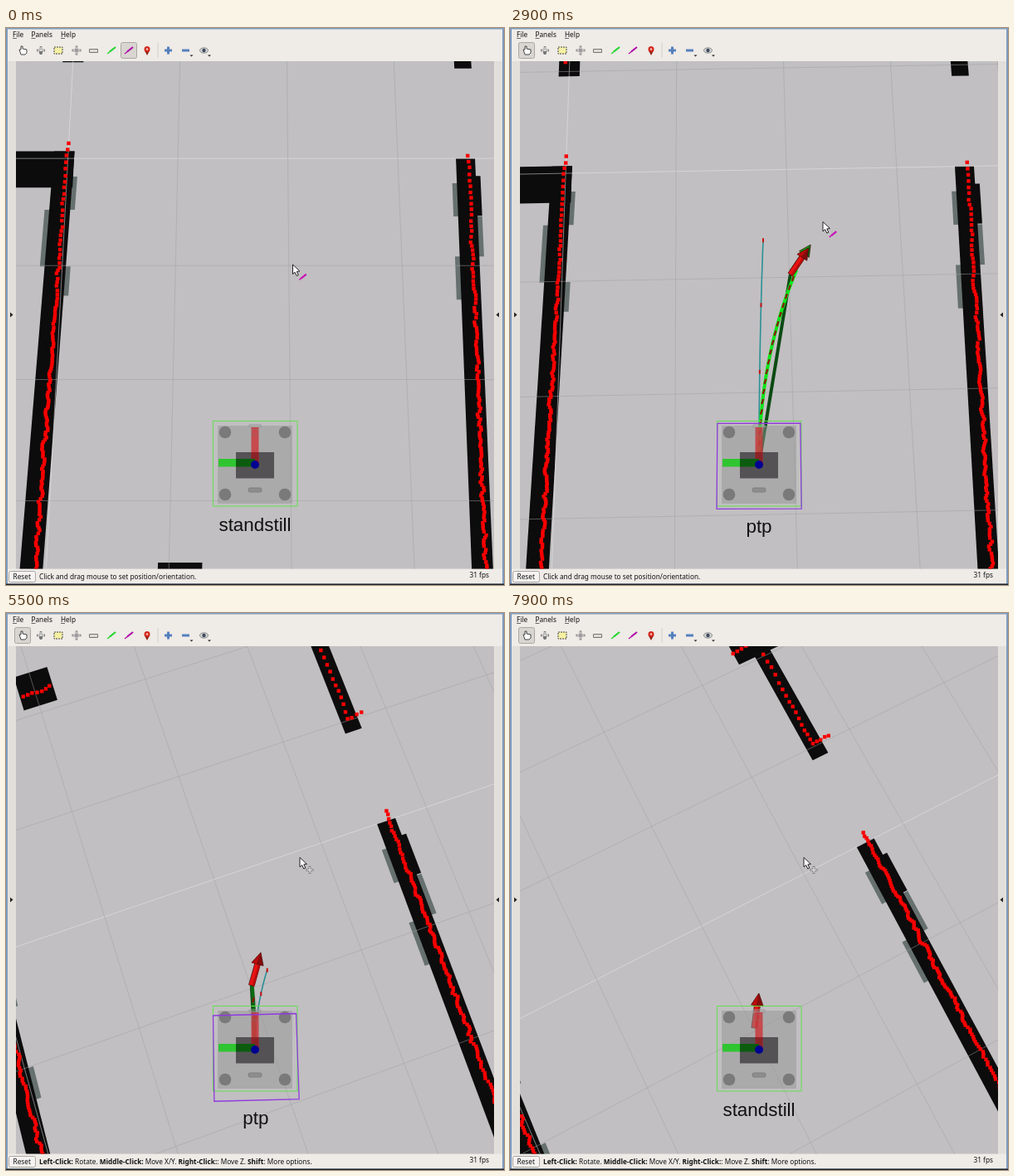
Recreate the animation shown at these times as an HTML page with a canvas. Size 600 by 671 pixels, loop 8000 ms.

```html
<!DOCTYPE html>
<html lang="en">
<head>
<meta charset="utf-8">
<title>Robot navigation view</title>
<style>
html, body { margin: 0; height: 100%; overflow: hidden; background: #efebe7; }
canvas { display: block; }
</style>
</head>
<body>
<canvas id="view" width="600" height="671"></canvas>
<script>
const ctx = document.getElementById('view').getContext('2d');
const LOOP = 8000, STEP = 100, START = 2300, STOP = 7200, RELEASE = 1500, HOVER = 4700;
const UI = '8.25px "Noto Sans", "Open Sans", sans-serif';

// Distance driven over time; heading and sideways drift follow from it
const DRIVE = [[START, 0], [2900, 15.9], [4000, 74.2], [5500, 175.9], [6300, 210.6], [STOP, 224.2]];
const GOAL = { x: 44.3, y: 249.5, dx: 0.573, dy: 0.819 };

// Long side walls: centre x = x + lean * y; patches alternate between the sides
const SIDES = [
  { x: -259.6, lean: 0.0235, half: 13.5, top: 400, seen: 418, side: 1, patches: [365, 320, 245, 207] },
  { x: 268.8, lean: 0.0175, half: 12.5, top: 390, seen: 403, side: -1, patches: [356, 311, 258, 202] }
];
// Other obstacles: x, y, width, height
const CORNER = [-420, 350, 183, 50], KERB = [-114, -200, 52, 88];
const UPPER = [[268, 518, 23, 170], [244, 682, 66, 68], [-259, 527, 28, 230], [-122, 688, 46, 50]];

const mix = (a, b, u) => a + (b - a) * u;
const clamp = u => Math.max(0, Math.min(1, u));
const noise = (a, b) => { const v = Math.sin(a * 127.1 + b * 311.7) * 43758.5; return v - Math.floor(v); };
const centre = (w, y) => w.x + w.lean * y;

function speed(i) {
  if (i === 0 || i === DRIVE.length - 1) return 0;
  return (DRIVE[i + 1][1] - DRIVE[i - 1][1]) / (DRIVE[i + 1][0] - DRIVE[i - 1][0]);
}

function driven(t) {
  let i = 0;
  while (i < DRIVE.length - 2 && t > DRIVE[i + 1][0]) i++;
  const [t0, a] = DRIVE[i], [t1, b] = DRIVE[i + 1], d = t1 - t0, u = clamp((t - t0) / d);
  return mix(a, b, u * u * (3 - 2 * u)) + d * u * (1 - u) * (speed(i) * (1 - u) - speed(i + 1) * u);
}

function poseAt(t) {
  const y = driven(t), r = y * (0.063 + 0.000262 * y) * Math.PI / 180;
  return { x: 0.00075 * y * y, y, c: Math.cos(r), s: Math.sin(r) };
}

let pose;
function local(x, y) {
  const dx = x - pose.x, dy = y - pose.y;
  return [pose.c * dx - pose.s * dy, pose.s * dx + pose.c * dy];
}
function project([x, y]) {
  const k = 1 + 2.23e-4 * y;
  return [300 + x / k, 526 - 1.028 * y / k];
}
const at = (x, y) => project(local(x, y));

function trace(pts) {
  ctx.beginPath();
  pts.forEach(p => ctx.lineTo(p[0], p[1]));
}
function paint(fill, stroke, width = 1) {
  if (fill) { ctx.fillStyle = fill; ctx.fill(); }
  if (stroke) { ctx.strokeStyle = stroke; ctx.lineWidth = width; ctx.stroke(); }
}
function line(pts, color, width) {
  trace(pts);
  paint(null, color, width);
}
function poly(pts, fill, stroke, width) {
  trace(pts);
  ctx.closePath();
  paint(fill, stroke, width);
}
function box(x, y, w, h, fill, stroke, r = 0) {
  ctx.beginPath();
  ctx.roundRect(x, y, w, h, r);
  paint(fill, stroke);
}
function disc(x, y, r, fill, stroke, ry = r) {
  ctx.beginPath();
  ctx.ellipse(x, y, r, ry, 0, 0, 7);
  paint(fill, stroke);
}
function text(s, x, y, font = UI, align = 'left') {
  ctx.font = font;
  ctx.textAlign = align;
  ctx.fillStyle = '#111';
  ctx.fillText(s, x, y);
  return x + ctx.measureText(s).width;
}

function slab([x, y, w, h]) {
  poly([at(x, y), at(x + w, y), at(x + w, y + h), at(x, y + h)], '#0c0c0c');
}
// Part of a side wall between two heights and two offsets from its centre
function strip(w, y0, y1, a, b, color) {
  const p = (y, d) => at(centre(w, y) + d, y);
  poly([p(y0, a), p(y0, b), p(y1, b), p(y1, a)], color);
}

function drawMap() {
  for (const w of SIDES) {
    w.patches.slice(1).forEach((low, i) =>
      strip(w, low, w.patches[i], 0, (i % 2 ? -1 : 1) * w.side * (w.half + 6), '#66706f'));
    strip(w, -220, w.top, -w.half, w.half, '#0c0c0c');
  }
  strip(SIDES[1], 312, 366, 0, 18.5, '#0c0c0c');
  [CORNER, KERB, ...UPPER].forEach(slab);
  for (let i = -7; i <= 7; i++) {
    const x = -245 + 144 * i, y = 390 + 144 * i;
    const color = i ? 'rgba(160,160,164,.5)' : 'rgba(235,235,235,.5)';
    line([at(x, -700), at(x, 1400)], color);
    line([at(-1250, y), at(760, y)], color);
  }
}

// Lines the laser hits: side walls, and the near faces of the upper obstacles
function surfaces() {
  const out = SIDES.map(w => [local(centre(w, w.seen) + 4, w.seen), local(centre(w, -300) + 4, -300)]);
  for (const [x, y, w, h] of UPPER) {
    const face = y + 20, mid = x + w / 2;
    if (h > 100) {
      out.push([local(mid, face), local(mid, y + h)]);
      out.push([local(mid, face), local(mid + Math.sign(x) * w, face)]);
    } else out.push([local(x, face), local(x + w, face)]);
  }
  return out;
}

function drawLaser(n) {
  const walls = surfaces(), reach = 588;
  ctx.fillStyle = '#f80000';
  for (let a = 0, i = 0; a < 2 * Math.PI; a += 0.0112, i++) {
    const dx = Math.sin(a), dy = Math.cos(a);
    let range = reach;
    for (const [p, q] of walls) {
      const ex = q[0] - p[0], ey = q[1] - p[1], det = dx * ey - dy * ex;
      const r = (p[0] * ey - p[1] * ex) / det, u = (p[0] * dy - p[1] * dx) / det;
      if (r > 0 && r < range && u >= 0 && u <= 1) range = r;
    }
    if (range === reach) continue;
    range += (noise(n, i) + noise(n, i + 1) - 1) * 3;
    const [x, y] = project([dx * range, dy * range]);
    ctx.fillRect(x - 2.2, y - 2.2, 4.4, 4.4);
  }
}

function drawArrow(light, dark, head, shift = 0) {
  const p = (f, s) => {
    f += shift;
    return at(GOAL.x + GOAL.dx * f + GOAL.dy * s, GOAL.y + GOAL.dy * f - GOAL.dx * s);
  };
  poly([p(0, -3.5), p(28, -3.5), p(28, 3.5), p(0, 3.5)], light, '#400808', 0.7);
  poly([p(0, 1), p(28, 1), p(28, 3.5), p(0, 3.5)], dark);
  poly([p(27, -7.5), p(42, 0), p(27, 7.5)], head, '#400606', 0.7);
  poly([p(27, -7), p(41, 0), p(27, -1)], dark);
}

// Quadratic curve that leaves the robot straight ahead
function curve([x, y], bend) {
  return Array.from({ length: 21 }, (_, i) => {
    const u = i / 20;
    return project([x * u * u, 2 * y * bend * u * (1 - u) + y * u * u]);
  });
}

function drawPlan(t) {
  const goal = local(GOAL.x, GOAL.y), done = driven(t) / 224.2;
  line([project([0, 0]), project(goal)], '#0b4a12', 4);

  const ray = curve([24 * Math.sin(Math.PI * done), 40 + 258 * (1 - done)], 0.5);
  line(ray, '#2a9096', 1.6);
  for (let i = 20; i > 4; i -= 6) box(ray[i][0] - 1, ray[i][1] - 2, 2, 5, '#c81414');

  const far = clamp((goal[1] - 60) / 120);
  const end = local(GOAL.x + 8 * far, GOAL.y + 6 * far);
  const path = curve(end, 0.53);
  line(path, far > 0.2 ? '#0be81a' : '#0c6a14', 4);
  const gap = Math.max(1, Math.round(360 / end[1]));
  for (let i = gap; i < 20; i += gap) {
    const [x, y] = path[i];
    line([[x - 1, y + 3], [x + 1, y - 3]], '#8c1408', 2.2);
  }
}

function drawRobot() {
  box(255, 479, 90, 94, 'rgba(150,150,150,.5)');
  box(293, 478, 14, 3, null, '#999');
  for (const x of [264, 336]) for (const y of [487, 562]) disc(x, y, 7.3, '#7b7a7b');
  box(292, 554, 16, 5, '#8f8e8f', '#7f7e7f', 2);
  box(277, 511, 46, 31.5, '#545254');
  box(295.5, 481, 9, 45, 'rgba(205,50,55,.8)');
  box(295.5, 511, 9, 15, '#8a2328');
  dashed(1, () => box(296.5, 483.5, 7, 7, null, '#8d6a6a'));
  box(256, 519, 21, 9.5, '#2fc531');
  box(277, 519, 23, 9.5, '#0b5c0e');
  disc(300, 526, 5, '#000090');
}

function dashed(on, draw) {
  ctx.setLineDash([on, 1]);
  draw();
  ctx.setLineDash([]);
}

function footprint(t) {
  const p = poseAt(t);
  const place = (x, y) => at(p.x + p.c * x + p.s * y, p.y - p.s * x + p.c * y);
  poly([place(-50.5, 51), place(50.5, 51), place(50.5, -49), place(-50.5, -49)], null, '#9038e0', 1.3);
  return place(0, 0);
}

function drawCursor(t) {
  const drag = clamp((t - 800) / 600), back = clamp((t - HOVER) / 400);
  const x = mix(mix(345.5, 377, drag), 354, back), y = mix(mix(285, 233.5, drag), 294.5, back);
  const shape = [[0, 0], [0, 11.5], [2.6, 9.2], [4.8, 13.6], [6.8, 12.6], [4.8, 8.4], [8.4, 8]];
  poly(shape.map(p => [x + p[0], y + p[1]]), '#fff', '#222');
  if (t < HOVER) toolArrow(x + 12, y + 15, '#c810b8', 0.85);
  else moveIcon(x + 12, y + 15, 4.5);
}

function moveIcon(x, y, r) {
  for (const [color, width, cut] of [['#777', 2.6, 0], ['#eee', 1.2, 1]]) {
    line([[x - r + cut, y], [x + r - cut, y]], color, width);
    line([[x, y - r + cut], [x, y + r - cut]], color, width);
  }
}

function toolArrow(x, y, color, k = 1) {
  line([[x - 5 * k, y + 4 * k], [x - k, y + k]], color, 1.4);
  line([[x - 2 * k, y + 1.5 * k], [x + 5 * k, y - 4 * k]], color, 2.2);
}

function drawToolbar(active) {
  box(active - 9.5, 17.5, 19, 19, '#d9d5d1', '#aaa6a2', 2);
  poly([[16, 26], [18, 26], [18, 22], [20, 22], [20, 25], [25, 26], [25, 30], [23, 32], [18, 32]], '#fff', '#333', 0.9);
  moveIcon(42, 27, 5);
  box(40, 28, 4, 3, '#777');
  box(58, 23, 10, 8, '#f6f0a4');
  dashed(2, () => box(58, 23, 10, 8, null, '#444'));
  moveIcon(85, 27, 5.5);
  disc(85, 27, 2, '#999');
  box(100.5, 25.5, 10, 4, '#dedbd2', '#777');
  toolArrow(127, 27, '#22d52c');
  toolArrow(148, 27, '#b010a8');
  poly([[166.8, 27], [170, 33], [173.2, 27]], '#8c2418');
  disc(170, 25.5, 3.5, '#d3261c');
  disc(170, 25.5, 1.3, '#f3c6b8');
  line([[183, 18], [183, 36]], '#d0ccc8');
  for (const x of [195.5, 216.5]) line([[x - 4.5, 27], [x + 4.5, 27]], '#5580bd', 3);
  line([[195.5, 22.5], [195.5, 31.5]], '#5580bd', 3);
  disc(238.5, 27, 5, '#d9d9d9', '#888', 3.2);
  disc(238.5, 27, 2.2, '#3c4a5c');
  for (const x of [223.5, 245]) poly([[x - 2, 32.5], [x + 2, 32.5], [x, 34.5]], '#222');
}

function drawWindow(t) {
  box(0, 0, 600, 671, '#7f9bc0');
  box(2, 1.5, 596, 668, '#efebe7');
  box(2, 40, 596, 611.5, '#e2dfdb');
  box(0, 669.5, 600, 1.5, '#20242a');
  for (const [label, x] of [['File', 8], ['Panels', 30.5], ['Help', 66]]) {
    text(label, x, 11);
    line([[x, 12.5], [x + 5, 12.5]], '#333', 0.7);
  }
  drawToolbar(t < RELEASE ? 148 : 20);
  poly([[5, 342.5], [8.5, 345.5], [5, 348.5]], '#222');
  poly([[594, 342.5], [590.5, 345.5], [594, 348.5]], '#222');
  box(3.5, 654.5, 32, 13, '#f5f3f1', '#aaa6a2', 2);
  text('Reset', 8.5, 664);
  // Parts alternate between plain and bold
  const status = t < HOVER ? ['Click and drag mouse to set position/orientation.'] :
    ['', 'Left-Click:', ' Rotate. ', 'Middle-Click:', ' Move X/Y. ', 'Right-Click:', ': Move Z. ', 'Shift', ': More options.'];
  status.reduce((x, s, i) => text(s, x, 664, (i % 2 ? 'bold ' : '') + UI), 40);
  text('31 fps', 558.5, 662);
}

function drawScene(t) {
  const n = t / STEP, moving = t >= START && t < STOP;
  box(12, 40, 576, 612, '#c1bfc1');
  pose = poseAt(t);
  drawMap();
  drawLaser(n);
  if (moving) drawPlan(t);
  if (t >= 900 && t < RELEASE) drawArrow('#16d61a', '#12a512', '#0c6c10');
  if (moving && n % 7 < 3) drawArrow('#16d61a', '#12a512', '#0c6c10', 5);
  if (t >= RELEASE) drawArrow('#e81212', '#b80c0c', '#840c0c');
  drawRobot();
  box(249.5, 473.5, 101.5, 102.5, null, '#62e04e');
  // The plan's outline and label trail the live pose a little
  const [x, y] = moving ? footprint(t - n % 4 * 50) : [300, 526];
  text(moving ? 'ptp' : 'standstill', x, y + 80, '22.4px "Liberation Sans", Arial, sans-serif', 'center');
  drawCursor(t);
}

function tick(now) {
  const t = Math.floor(now % LOOP / STEP) * STEP;
  drawWindow(t);
  ctx.save();
  ctx.beginPath();
  ctx.rect(12, 40, 576, 611.5);
  ctx.clip();
  drawScene(t);
  ctx.restore();
  requestAnimationFrame(tick);
}
requestAnimationFrame(tick);
</script>
</body>
</html>
```
